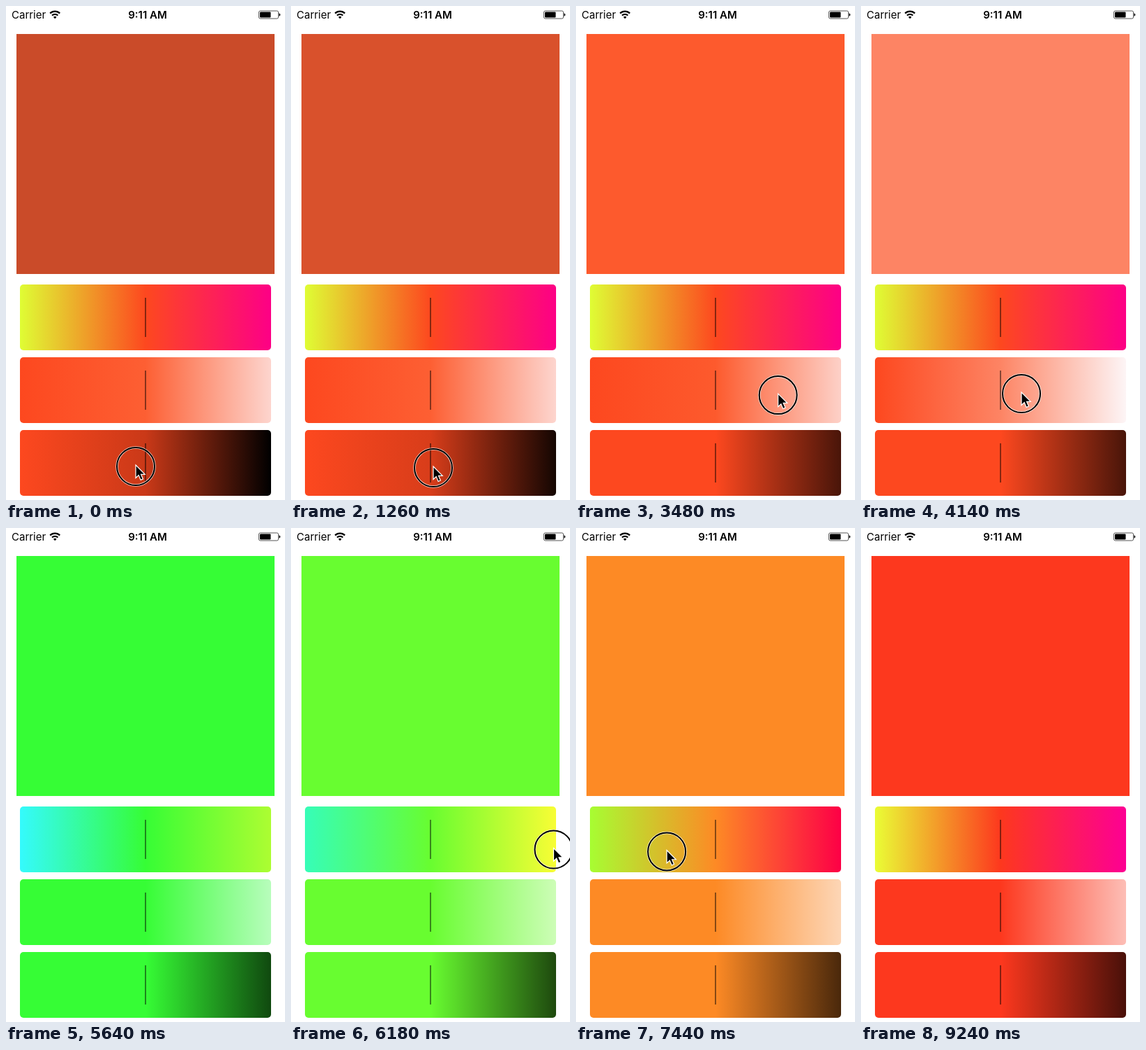
An HTML page that plays this animation: 400x706 px, repeating every 9.3 s.

```html
<!DOCTYPE html>
<html lang="en">
<head>
<meta charset="utf-8">
<title>Colour picker</title>
<style>
  html, body { margin: 0; width: 100%; height: 100%; overflow: hidden; background: #fff; }
  #stage { position: relative; width: 400px; height: 706px; overflow: hidden; background: #fff; }
  #stage > * { position: absolute; }
  .label { top: 4px; font: 15px/18px Inter, Roboto, sans-serif; color: #000; white-space: nowrap; }
  #carrier { left: 8px; }
  #clock { left: 143px; width: 120px; text-align: center; font-weight: 600; }
  #swatch { left: 15px; top: 40px; width: 370px; height: 343px; }
  .bar { left: 20px; width: 360px; height: 94px; border-radius: 5px; }
  .bar::after {
    content: ""; position: absolute; left: 179px; top: 19px;
    width: 2px; height: 56px; background: rgba(0, 0, 0, .47);
  }
  #hue { top: 398px; }
  #saturation { top: 502px; }
  #brightness { top: 606px; }
  svg { left: 0; top: 0; }
</style>
</head>
<body>
<div id="stage">
  <div class="label" id="carrier">Carrier</div>
  <div class="label" id="clock">9:11 AM</div>
  <div id="swatch"></div>
  <div class="bar" id="hue"></div>
  <div class="bar" id="saturation"></div>
  <div class="bar" id="brightness"></div>
  <svg width="400" height="706" viewBox="0 0 400 706">
    <g fill="none" stroke="#000" stroke-width="2.2">
      <path d="M63.2 10.6a9.8 9.8 0 0 1 14 0"/>
      <path d="M66 13.6a5.9 5.9 0 0 1 8.4 0"/>
    </g>
    <path d="M70.2 18.2l-2.3-2.4a3.3 3.3 0 0 1 4.6 0z"/>
    <rect x="362.5" y="7" width="28" height="11" rx="2" fill="none" stroke="#555"/>
    <rect x="364" y="8.5" width="15.5" height="8" rx="1"/>
    <path d="M391.5 10.3q1.8.5 1.8 2.2t-1.8 2.2z"/>
    <g id="cursor">
      <circle r="27" fill="none" stroke="#fff" stroke-opacity=".75" stroke-width="3.6"/>
      <circle r="27" fill="none" stroke="#000" stroke-width="2"/>
      <path d="M0-2V16.5L4.2 12.6 7.1 19.4 10.4 18 7.5 11.3H13.2Z" stroke="#fff" stroke-width="1.2"/>
    </g>
  </svg>
</div>
<script>
const LOOP = 9300, STEP = 60;

// The pointer drags the brightness, saturation and hue bars in turn, then leaves.
const PATH = [
  { t: 0, x: 186, y: 658 },
  { t: 1260, x: 204, y: 660 },
  { t: 1980, x: 255, y: 660 },
  { t: 2340, x: 283, y: 560 },
  { t: 2880, x: 344, y: 558 },
  { t: 4140, x: 230, y: 554 },
  { t: 4740, x: 330, y: 556 },
  { t: 4980, x: 78, y: 458 },
  { t: 5640, x: 448, y: 458 },
  { t: 6720, x: 305, y: 461 },
  { t: 7700, x: 67, y: 463 },
  { t: 8640, x: 80, y: 745 },
  { t: LOOP, x: 80, y: 745 }
];

const el = id => document.getElementById(id);
const clamp = (v, low = 0, high = 1) => Math.min(high, Math.max(low, v));

function pointerAt(t) {
  const i = PATH.findIndex(point => point.t > t);
  const from = PATH[i - 1], to = PATH[i];
  const k = (t - from.t) / (to.t - from.t);
  return { x: from.x + (to.x - from.x) * k, y: from.y + (to.y - from.y) * k };
}

// Pointer x while a drag lasts, held at its ends before and after
const dragX = (t, start, end) => pointerAt(clamp(t, start, end)).x;

// HSB in a gamma 1.8 space, shown at gamma 2.2 with slight leaks between primaries
function color(hue, saturation, brightness) {
  const s = clamp(saturation), b = clamp(brightness);
  const linear = n => {
    const k = (n + hue / 60 + 6) % 6;
    return (b - b * s * clamp(Math.min(k, 4 - k))) ** 1.8;
  };
  const red = linear(5), green = linear(3), blue = linear(1);
  const shown = [red + .033 * green, green, blue + .008 * red + .025 * green];
  return `rgb(${shown.map(v => Math.round(253 * clamp(v) ** (1 / 2.2)))})`;
}

function paintBar(id, values, colorAt) {
  el(id).style.background = `linear-gradient(to right, ${values.map(colorAt).join(", ")})`;
}

function draw() {
  const t = Math.floor(performance.now() % LOOP / STEP) * STEP;
  const b = clamp(.757 + (dragX(t, 0, 1980) - 186) * .0038);
  const s = clamp(.7 + (dragX(t, 2340, 4740) - 230) * .0036);
  const h = 81 + (dragX(t, 4980, 7700) - 305) * .3;

  el("swatch").style.background = color(h, s, b);
  paintBar("hue", [h + 57, h, h - 40], v => color(v, 1, 1));
  paintBar("saturation", [s + .65, s, s - .65], v => color(h, v, 1));
  paintBar("brightness", [b + .78, b, b - .78], v => color(h, 1, v));

  const { x, y } = pointerAt(t);
  el("cursor").setAttribute("transform", `translate(${x} ${y})`);
  requestAnimationFrame(draw);
}
draw();
</script>
</body>
</html>
```
